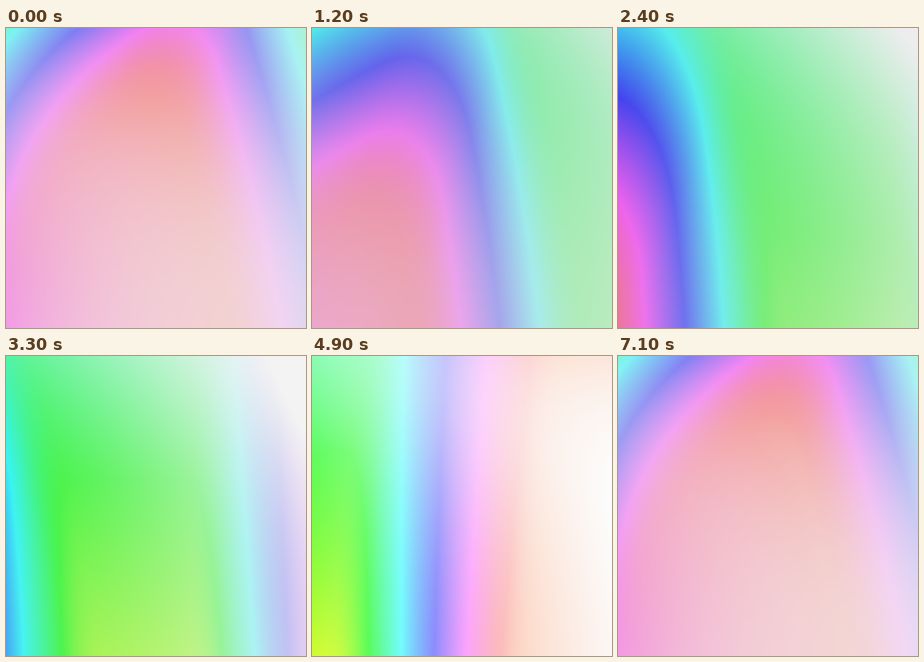
An HTML page with a canvas that plays this animation: 300x300 px, repeating every 7.2 s.

```html
<!DOCTYPE html>
<html>
<head>
<meta charset="utf-8">
<style>
html, body { margin: 0; width: 100%; height: 100%; overflow: hidden; }
canvas { display: block; width: 300px; height: 300px; }
</style>
</head>
<body>
<canvas id="stage" width="300" height="300"></canvas>
<script>
const SIZE = 300, HALF = SIZE / 2, LOOP = 7200, STEP = 100;
const ctx = document.getElementById('stage').getContext('2d');
const image = ctx.createImageData(SIZE, SIZE);

const mix = (a, b, k) => a + (b - a) * k;
const bump = x => Math.exp(-x * x);
const wave = (t, peak) => Math.cos(2 * Math.PI * (t - peak) / LOOP);

function softMin(a, b, k) {
  const h = Math.max(k - Math.abs(a - b), 0) / k;
  return Math.min(a, b) - h * h * k / 4;
}
const softMax = (a, b, k) => -softMin(-a, -b, k);

// Hue ramp across a bent line; cyan lies `offset` px from the centre, 60 degrees take `width` px
function makeFront({ angle, offset, width, bend, fan = 0 }) {
  const c = Math.cos(angle * Math.PI / 180), s = Math.sin(angle * Math.PI / 180);
  return (x, y) => {
    const along = (y * c - x * s) / HALF;
    const dist = x * c + y * s - offset + bend * along * along;
    return 180 + 60 * dist / (width * (1 - fan * y));
  };
}

// Green to red: slides in from the right, slows down and tips over
const makeRise = age => makeFront({
  angle: 45 + 50 * Math.tanh((age - 400) / 1900),
  offset: -216 + 0.01 * age + 52 * Math.log(1 + Math.exp(-(age + 600) / 500)),
  width: 37 + 0.018 * Math.max(0, age),
  bend: -40 * bump(age / 1200),
  fan: 0.0008
});

// Red to green: follows at a steady speed and straightens up
const makeFall = age => makeFront({
  angle: -15 + 11 * Math.tanh(age / 2500),
  offset: 168 - 0.094 * age,
  width: -39,
  bend: 5
});

function makeBand(age) {
  const rise = makeRise(age), fall = makeFall(age);
  return (x, y, top) => softMin(softMin(rise(x, y), fall(x, y), 110), top, 40);
}

// Share of white, a wave that drifts over the stage
function paleness(t, u, v) {
  const peak = 8000 - 2600 * u - 2200 * (1 - v) ** 2;
  return 0.42 + 0.42 * u + (0.17 + 0.08 * v - 0.12 * u * v) * wave(t, peak);
}

function draw(t) {
  const next = makeBand(t - LOOP), last = makeBand(t);
  const greenLow = 100 + 28 * wave(t, 1000);
  const value = 0.955 + 0.035 * wave(t, 5200);
  const pink = 80 * bump(((t > LOOP / 2 ? t - LOOP : t) - 400) / 1200);
  let p = 0;
  for (let y = 0; y < SIZE; y++) {
    const v = y / SIZE, green = mix(142, greenLow, v);
    for (let x = 0; x < SIZE; x++) {
      const u = x / SIZE, cx = x - HALF, cy = y - HALF;
      const red = 380 - pink * (1 - u) * Math.sqrt(v);
      const band = softMax(next(cx, cy, red), last(cx, cy, red), 40);
      const hue = softMax(band, green, 30) / 60;
      const chroma = Math.max(0, value - paleness(t, u, v));
      for (let n = 5; n > 0; n -= 2) {
        const k = (n + hue) % 6;
        image.data[p++] = 255 * (value - chroma * Math.max(0, Math.min(k, 4 - k, 1)));
      }
      image.data[p++] = 255;
    }
  }
  ctx.putImageData(image, 0, 0);
}

const start = performance.now();
let shown = -1;
function tick() {
  const t = Math.floor((performance.now() - start) % LOOP / STEP) * STEP;
  if (t !== shown) draw(shown = t);
  requestAnimationFrame(tick);
}
tick();
</script>
</body>
</html>
```
